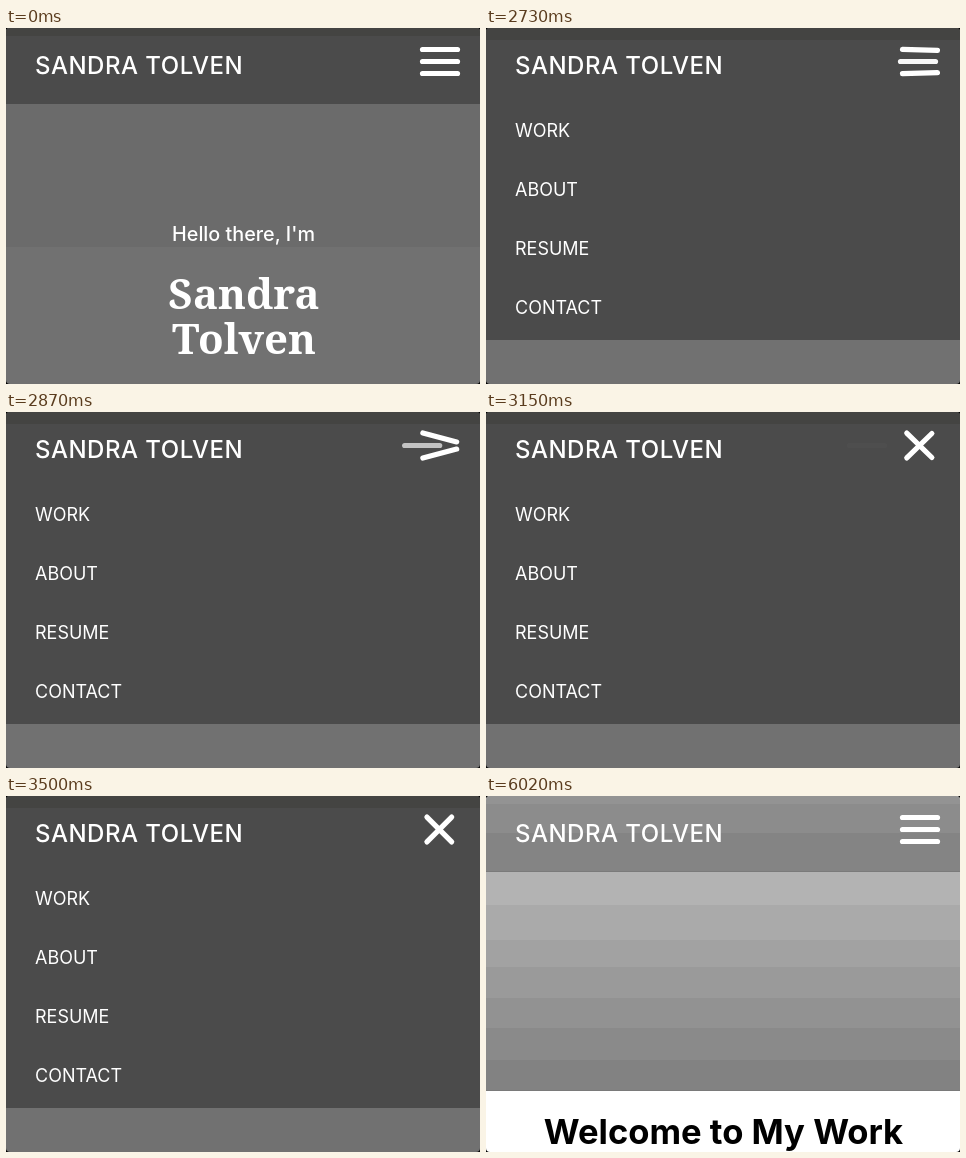
Write an HTML page that moves like this. It is 474 px wide and 356 px high and loops after 8000 ms.

```html
<!DOCTYPE html>
<html lang="en">
<head>
<meta charset="utf-8">
<title>Portfolio menu</title>
<style>
  html, body { margin: 0; width: 100%; height: 100%; overflow: hidden; background: #000; }
  svg { display: block; width: 474px; height: 356px; border-radius: 4px; }
  text { font-family: Inter, sans-serif; fill: #fff; }
  .brand { font-size: 24px; font-weight: 500; letter-spacing: .5px; }
  .nav text { font-size: 18px; }
  .hello { font-size: 19.8px; font-weight: 500; }
  .name { font: bold 42px "Noto Serif", serif; }
  .title { font-size: 34.6px; font-weight: 700; fill: #000; }
  .mid { text-anchor: middle; }
  .bars { stroke: #fff; stroke-width: 5.2; stroke-linecap: round; }
</style>
</head>
<body>
<svg viewBox="0 0 474 356">
  <g id="home">
    <rect width="474" height="356" fill="#717171"/>
    <rect width="474" height="219" fill="#6b6b6b"/>
    <rect width="474" height="76" fill="#4b4b4b"/>
    <rect width="474" height="8" fill="#444442"/>
    <text class="hello mid" x="237.5" y="213">Hello there, I'm</text>
    <text class="name mid" x="238" y="281">Sandra</text>
    <text class="name mid" x="238" y="326">Tolven</text>
  </g>
  <g id="menu">
    <rect width="474" height="356" fill="#717171"/>
    <rect width="474" height="312" fill="#4b4b4b"/>
    <rect width="474" height="12" fill="#444442"/>
    <g id="hover">
      <rect x="13" y="84" width="449" height="43" fill="#444442"/>
      <rect x="13" y="121" width="89" height="6" fill="#5b8a99"/>
    </g>
    <g class="nav">
      <text x="29" y="109">WORK</text>
      <text x="29" y="168">ABOUT</text>
      <text x="29" y="227">RESUME</text>
      <text x="29" y="286">CONTACT</text>
    </g>
  </g>
  <g id="work">
    <rect width="474" height="356" fill="#fff"/>
    <g id="bands"></g>
    <text class="title mid" x="237.5" y="348">Welcome to My Work</text>
  </g>
  <text class="brand" x="29" y="46">SANDRA TOLVEN</text>
  <g class="bars">
    <path id="top" d="M-17.5 0H17.5"/>
    <path id="middle" d="M-17.5 0H17.5"/>
    <path id="bottom" d="M-17.5 0H17.5"/>
  </g>
</svg>
<script>
const LOOP = 8000, STEP = 70;
const OPEN = 2730, HOVER = 4200, WORK = 6020;
const MORPH_START = 2670, MORPH_TIME = 520;
const $ = id => document.getElementById(id);

// Stepped gradient: [top edge, grey level]
const bands = [[0, 147], [8, 140], [37, 132], [75, 122], [76, 179], [109, 170],
  [144, 162], [171, 154], [202, 146], [232, 138], [264, 130], [294, 122], [295, 255]];
$('bands').innerHTML = bands.slice(0, -1).map(([y, v], i) =>
  `<rect y="${y}" width="474" height="${bands[i + 1][0] - y}" fill="rgb(${v},${v},${v})"/>`).join('');

const show = (id, on) => $(id).setAttribute('display', on ? 'inline' : 'none');
const place = (id, x, y, angle) =>
  $(id).setAttribute('transform', `translate(${x} ${y}) rotate(${angle})`);

function draw(t) {
  const open = t >= OPEN && t < WORK;
  show('home', t < OPEN);
  show('menu', open);
  show('hover', t >= HOVER);
  show('work', t >= WORK);

  const u = open ? Math.min((t - MORPH_START) / MORPH_TIME, 1) : 0;
  const p = u * u * (3 - 2 * u);
  const x = 434 - 0.7 * p, gap = 12 * (1 - p);
  place('top', x, 33.5 - gap, 45 * p);
  place('bottom', x, 33.5 + gap, -45 * p);
  place('middle', 434 - 54 * p, 33.5, 0);
  $('middle').setAttribute('opacity', 1 - p);
}

const start = performance.now();
function tick() {
  const t = (performance.now() - start) % LOOP;
  draw(Math.floor(t / STEP) * STEP);
  requestAnimationFrame(tick);
}
tick();
</script>
</body>
</html>
```
